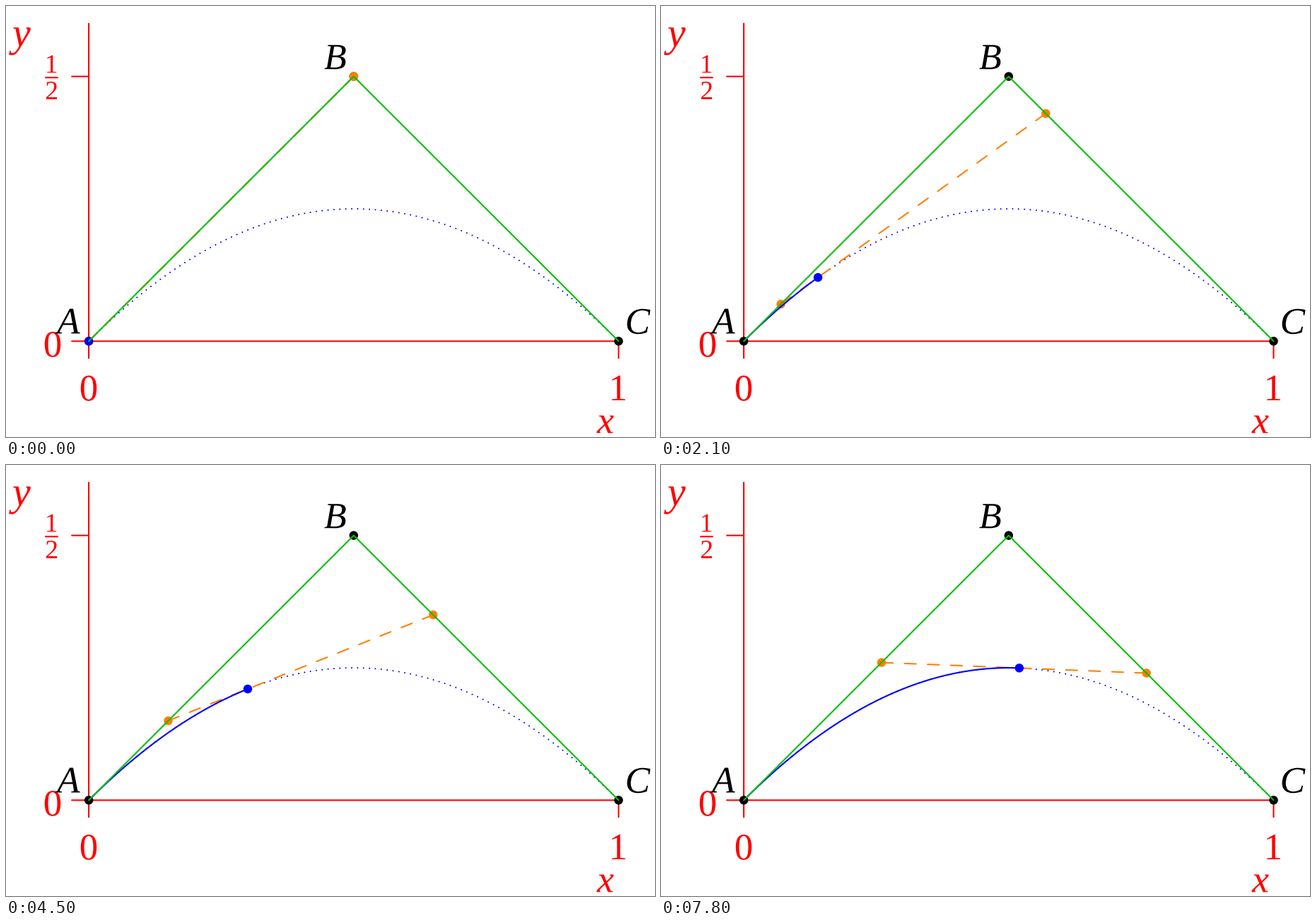
A matplotlib script that plays this animation: 918x610 px, repeating every 8000 ms.

```python
import numpy as np
import matplotlib.pyplot as plt
from matplotlib.animation import FuncAnimation
from matplotlib.patches import Circle, PathPatch
from matplotlib.textpath import TextPath
from matplotlib.transforms import Affine2D

WIDTH, HEIGHT, DPI = 918, 610, 64
POINT = 72 / DPI          # points per pixel
LINE = 2.08               # stroke width in pixels
UNIT = 749.4              # pixels per data unit
ORIGIN = np.array([117.1, 474.4])
RED, GREEN, ORANGE, BLUE = "#ff0000", "#00bf00", "#ff8000", "#0000ff"

INTERVAL = 100
FRAMES = 80
FRAMES_PER_STEP = 3
STEP = 0.02

plt.rcParams["lines.scale_dashes"] = False
fig = plt.figure(figsize=(WIDTH / DPI, HEIGHT / DPI), dpi=DPI, facecolor="white")
ax = fig.add_axes([0, 0, 1, 1])
ax.set_xlim(0, WIDTH)
ax.set_ylim(HEIGHT, 0)
ax.axis("off")


def to_stage(x, y):
    return ORIGIN + UNIT * np.array([x, -y])


A, B, C = to_stage(0, 0), to_stage(0.5, 0.5), to_stage(1, 0)


def stroke(points, color, z):
    x, y = np.transpose(points)
    line, = ax.plot(x, y, color=color, lw=LINE * POINT, zorder=z, snap=False,
                    solid_capstyle="round", dash_capstyle="round",
                    solid_joinstyle="round")
    return line


def dot(center, color, z):
    return ax.add_patch(Circle(center, 3 * LINE, fc=color, lw=0, zorder=z))


def label(text, cx, cy, size, color, style="normal", z=2):
    """Place text with its ink centred on (cx, cy)."""
    path = TextPath((0, 0), text, size=size,
                    prop={"family": "Liberation Serif", "style": style})
    box = path.get_extents()
    place = (Affine2D()
             .translate(-(box.x0 + box.x1) / 2, -(box.y0 + box.y1) / 2)
             .scale(1, -1).translate(cx, cy))
    ax.add_patch(PathPatch(place.transform_path(path), fc=color, lw=0, zorder=z))


def set_dashes(line, length, on, off):
    """Fit whole periods into the length so that it also ends with a dash."""
    periods = int(length / ((on + off) * LINE))
    fit = length / (periods * (on + off) + on) * POINT
    line.set_dashes((max(on * fit, 0.03), off * fit))


def split(p, q, t):
    return p + (q - p) * t


def curve(t_end, count=160):
    t = np.linspace(0, t_end, count)[:, None]
    return split(split(A, B, t), split(B, C, t), t)


# Axes and their labels
TICK = np.array([24, 24])
stroke([A - TICK * [1, 0], C], RED, 1)
stroke([A + TICK * [0, 1], to_stage(0, 0.6)], RED, 1)
stroke([C, C + TICK * [0, 1]], RED, 1)
half = to_stage(0, 0.5)
stroke([half - TICK * [1, 0], half], RED, 1)

label("0", 66, 479, 53, RED)
label("0", 117, 541, 53, RED)
label("1", 866.5, 540.5, 53, RED)
label("1", 64.7, 82, 37.5, RED)
label("2", 64.5, 119.5, 37.5, RED)
stroke([(56, 101.3), (73, 101.3)], RED, 2)
label("x", 847.5, 592, 54, RED, "italic")
label("y", 19.5, 50, 58, RED, "italic")
label("A", 87, 446, 53, "black", "italic", 3)
label("B", 465.5, 72.3, 52, "black", "italic", 3)
label("C", 895, 446.5, 53, "black", "italic", 3)

# Static construction
full = curve(1, 400)
dotted = stroke(full, BLUE, 4)
set_dashes(dotted, np.hypot(*np.diff(full, axis=0).T).sum(), 0, 4)
for corner in (A, B, C):
    dot(corner, "black", 5)
stroke([A, B, C], GREEN, 10)

# Moving parts
link = stroke([A, B], ORANGE, 6)
left_dot, right_dot = dot(A, ORANGE, 7), dot(B, ORANGE, 7)
trace = stroke([A, A], BLUE, 8)
pen = dot(A, BLUE, 9)


def update(frame):
    t = frame // FRAMES_PER_STEP * STEP
    p, q = split(A, B, t), split(B, C, t)
    link.set_data(*np.transpose([p, q]))
    set_dashes(link, np.hypot(*(q - p)), 8, 8)
    left_dot.center = p
    right_dot.center = q
    trace.set_data(*curve(t).T)
    trace.set_visible(t > 0)
    pen.center = split(p, q, t)
    return link, left_dot, right_dot, trace, pen


animation = FuncAnimation(fig, update, frames=FRAMES, interval=INTERVAL,
                          repeat=True, repeat_delay=0)
plt.show()
```
